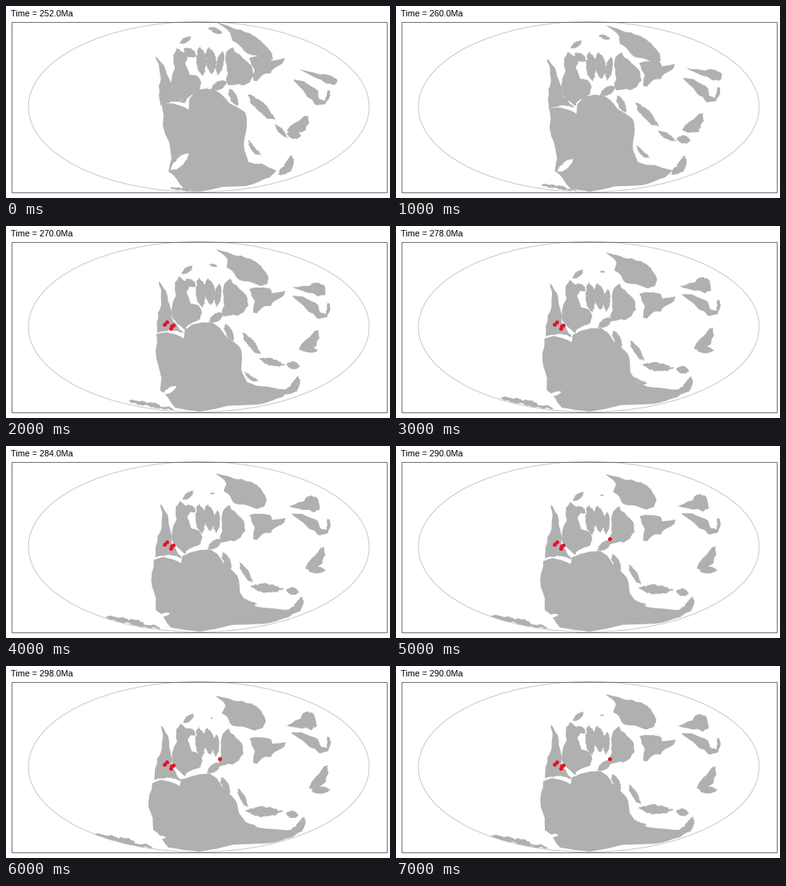
Write a matplotlib script that moves like this. It is 480 px wide and 240 px high and loops after 8 s.

```python
import numpy as np
import matplotlib.pyplot as plt
from matplotlib.animation import FuncAnimation
from matplotlib.patches import Ellipse, Polygon, Rectangle

W, H, DPI = 480, 240, 100
PX = 72 / DPI
LAND = "#b0b0b0"
RED = "#e3142a"

AGES = [252, 260, 270, 278, 284, 290, 298, 290]
# How far the plates have travelled at each age.
DRIFT = {252: 0, 260: 0.27, 270: 0.6, 278: 0.86, 284: 0.93, 290: 1, 298: 1.12}
DRAWN_AT = DRIFT[270]

fig = plt.figure(figsize=(W / DPI, H / DPI), dpi=DPI, facecolor="white")
ax = fig.add_axes([0, 0, 1, 1])
ax.set_xlim(0, W)
ax.set_ylim(H, 0)
ax.axis("off")

globe = Ellipse((241, 126), 426, 213, fc="none", ec="#c8c8c8", lw=PX, zorder=1)
ax.add_patch(globe)
ax.add_patch(Rectangle((6.5, 19.5), 469, 213, fc="none", ec="#666666",
                       lw=0.9 * PX, zorder=5))
plates = []


def points(flat):
    return np.reshape(flat, (-1, 2)).astype(float)


def blend(old, new, w):
    return (1 - w) * points(old) + w * points(new)


def ragged(shape, seed, amount, rounds=2):
    """Split each edge with a small sideways shift for a rough coast."""
    rng = np.random.default_rng(seed)
    for _ in range(rounds):
        edge = np.roll(shape, -1, axis=0) - shape
        side = np.column_stack([-edge[:, 1], edge[:, 0]])
        mid = shape + edge / 2 + side * rng.normal(0, amount, (len(shape), 1))
        shape = np.stack([shape, mid], axis=1).reshape(-1, 2)
    return shape


def add_plate(outline_at, color=LAND):
    patch = Polygon(np.zeros((3, 2)), fc=color, ec="none", zorder=2)
    ax.add_patch(patch)
    patch.set_clip_path(globe)
    plates.append((patch, outline_at))


def morph(old, new):
    """Land whose outline changes from one shape to another."""
    add_plate(lambda w: ragged(blend(old, new, w), 9, 0.03))


def block(outline, old, new):
    """Land carried by three anchor points through an affine map."""
    shape = ragged(points(outline), len(plates), 0.07)
    shape = np.column_stack([shape, np.ones(len(shape))])

    def corners(w):
        return np.column_stack([blend(old, new, w), np.ones(3)])

    base = np.linalg.inv(corners(DRAWN_AT))
    add_plate(lambda w: (shape @ base @ corners(w))[:, :2])


def sliver(old, new, width, bend=0, color=LAND):
    """Slim island between two moving ends; width and bend per length."""
    t = np.linspace(0, 1, 7)
    arch = np.sin(np.pi * t)
    edge = width * arch.clip(0) ** 0.7
    upper = np.column_stack([t, bend * arch + edge])
    lower = np.column_stack([t, bend * arch - edge])[-2:0:-1]
    u, v = ragged(np.vstack([upper, lower]), len(plates), 0.13).T[:, :, None]

    def outline_at(w):
        a, b = blend(old, new, w)
        along = b - a
        across = np.array([-along[1], along[0]])
        return a + u * along + v * across

    add_plate(outline_at, color)


# Gondwana and the bay in its south-west
morph([194, 122, 210, 122, 222, 126, 228, 130, 229, 117, 236, 106, 250, 103,
       262, 105, 270, 111, 280, 122, 299, 133, 301, 150, 298, 180, 303, 195,
       320, 197, 338, 206, 330, 214, 300, 225, 242, 232, 222, 228, 203, 207,
       207, 190, 204, 170, 196, 150],
      [184, 144, 196, 140, 208, 143, 218, 148, 220, 139, 228, 136, 242, 132,
       255, 131, 264, 137, 272, 149, 288, 164, 291, 174, 293, 185, 300, 195,
       330, 203, 367, 205, 355, 214, 325, 222, 242, 232, 205, 227, 186, 205,
       186, 190, 181, 176, 181, 160])
sliver([228, 184, 206, 206], [203, 211, 190, 213], 0.16, color="white")

# western strip, Laurentia
block([191, 69, 200, 81, 203, 95, 206, 104, 207, 114, 213, 122, 222, 134,
       212, 131, 204, 130, 189, 134, 190, 108, 194, 98, 194, 82],
      [184, 65, 193, 124, 222, 121], [190, 75, 186, 140, 218, 141])
block([216, 63, 211, 80, 210, 92, 207, 103, 208, 115, 214, 122, 224, 130,
       228, 124, 243, 116, 245, 108, 231, 97, 226, 84, 229, 76, 228, 71],
      [212, 53, 207, 108, 245, 101], [216, 70, 207, 121, 246, 121])

# Arctic strips, Greenland, Scandinavia, southern Europe
sliver([222, 54, 238, 63], [226, 76, 237, 84], 0.3)
sliver([242, 49, 246, 88], [241, 72, 245, 112], 0.16)
sliver([254, 51, 258, 85], [252, 74, 256, 108], 0.19)
sliver([271, 56, 264, 87], [264, 82, 262, 111], 0.15)
sliver([256, 105, 277, 94], [252, 131, 270, 118], 0.22)

# Baltica, Kazakhstan, Siberia
block([277, 68, 281, 66, 296, 82, 302, 92, 303, 100, 297, 108, 288, 112,
       272, 113, 270, 107, 273, 98, 272, 88],
      [281, 52, 309, 88, 273, 92], [277, 76, 297, 108, 265, 116])
block([304, 79, 318, 77, 331, 79, 332, 84, 349, 81, 347, 87, 333, 96,
       331, 100, 322, 101, 314, 109, 309, 108, 311, 94],
      [303, 58, 346, 70, 313, 90], [304, 80, 347, 97, 313, 115])
block([262, 29, 280, 34, 294, 37, 306, 41, 316, 48, 324, 57, 328, 65,
       327, 72, 318, 75, 298, 69, 288, 64, 276, 52, 277, 42],
      [259, 21, 331, 60, 276, 38], [256, 37, 323, 70, 266, 53])

# northern and north-eastern islands
sliver([217, 47, 232, 38], [221, 69, 235, 57], 0.18)
sliver([253, 27, 270, 34], [255, 62, 260, 61], 0.18)
block([353, 75, 378, 75, 386, 71, 396, 73, 399, 79, 399, 86, 390, 88,
       364, 79],
      [361, 72, 409, 95, 398, 82], [344, 67, 387, 72, 371, 57])
block([358, 87, 382, 94, 390, 98, 393, 108, 400, 110, 402, 96, 405, 97,
       404, 108, 401, 114, 388, 115, 378, 107, 366, 95],
      [361, 90, 393, 123, 408, 106], [358, 82, 397, 109, 407, 90])

# China blocks and Indochina
block([366, 154, 371, 146, 386, 131, 391, 130, 392, 140, 388, 150, 372, 157],
      [357, 152, 381, 136, 377, 153], [381, 147, 402, 123, 399, 143])
sliver([357, 151, 372, 157], [379, 155, 402, 155], 0.2)
sliver([351, 160, 369, 162], [350, 182, 366, 184], 0.28)

# Cimmerian chain, Adria, Arabia
sliver([302, 110, 337, 144], [291, 148, 306, 174], 0.12)
sliver([336, 148, 352, 165], [303, 178, 347, 180], 0.13)
sliver([279, 103, 290, 126], [270, 135, 281, 157], 0.17)
sliver([303, 168, 319, 187], [295, 192, 314, 199], 0.12, bend=0.1)

# south-eastern arc, polar fragments
sliver([358, 186, 339, 211], [372, 188, 352, 209], 0.18, bend=-0.15)
sliver([205, 227, 240, 232], [119, 212, 190, 228], 0.05)

WEST = [(198, 123), (200.5, 120.3), (205.5, 127.5), (207, 125.3),
        (208.5, 123.8)]
EAST = [(267, 115.5)]

dots, = ax.plot([], [], "o", color=RED, ms=5 * PX, mew=0, zorder=4)
label = ax.text(6.5, 13.2, "", family="Liberation Sans", size=10.8 * PX,
                color="black", va="baseline")


def draw(i):
    age = AGES[i]
    for patch, outline_at in plates:
        patch.set_xy(outline_at(DRIFT[age]))
    shown = (WEST if age >= 270 else []) + (EAST if age >= 290 else [])
    dots.set_data(*np.reshape(shown, (-1, 2)).T)
    label.set_text(f"Time = {age:.1f}Ma")
    return [dots, label] + [patch for patch, _ in plates]


anim = FuncAnimation(fig, draw, frames=len(AGES), interval=1000, repeat=True,
                     repeat_delay=0, blit=False)
plt.show()
```
